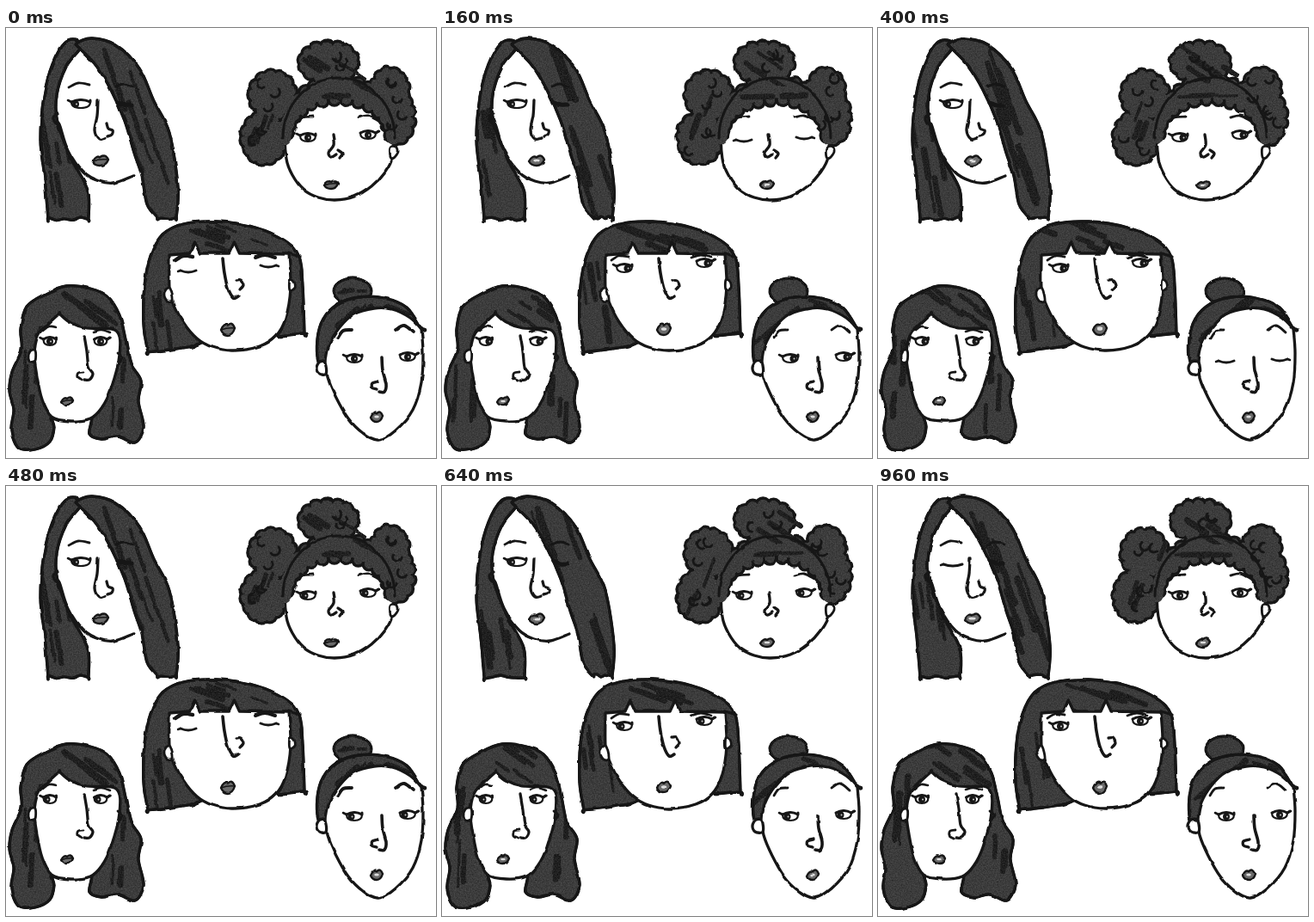
Recreate the animation shown at these times as an HTML page. Size 500x500 px, loop 1.04 s.

```html
<!DOCTYPE html>
<html lang="en">
<head>
<meta charset="utf-8">
<title>Five faces</title>
<style>
html, body { margin: 0; width: 100%; height: 100%; overflow: hidden; background: #fff; }
svg { display: block; width: 100vw; height: 100vh; }
</style>
</head>
<body>
<svg id="stage" viewBox="0 0 500 500"></svg>
<script>
const INK = '#171717', TONE = '#3c3c3c', DARK = '#202020', STEP = 80;
const ORDER = 'AEBDECABDACBE', SHEETS = 'ABCDE';
let clips = 0;

function random(seed) {
  let s = seed * 7919 + 17;
  return () => (s = (s * 16807) % 2147483647) / 2147483647;
}

// Smooth curve through points; a repeated point makes a corner.
function curve(s, closed) {
  const n = s.trim().split(/\s+/).map(Number), p = [];
  for (let i = 0; i < n.length; i += 2) p.push([n[i], n[i + 1]]);
  const L = p.length, at = i => closed ? p[(i + L) % L] : p[Math.max(0, Math.min(L - 1, i))];
  let d = 'M' + p[0];
  for (let i = 0; i < (closed ? L : L - 1); i++) {
    const [a, b, c, e] = [at(i - 1), at(i), at(i + 1), at(i + 2)];
    d += `C${b[0] + (c[0] - a[0]) / 6} ${b[1] + (c[1] - a[1]) / 6} ${c[0] - (e[0] - b[0]) / 6} ${c[1] - (e[1] - b[1]) / 6} ${c}`;
  }
  return d + (closed ? 'Z' : '');
}

const shape = (d, fill = 'none', w = 3.3, stroke = INK) =>
  `<path d="${d}" fill="${fill}" stroke="${stroke}" stroke-width="${w}"/>`;
const line = (s, w) => shape(curve(s), 'none', w);
const skin = (s, w) => shape(curve(s, true), '#fff', w);
const oval = (x, y, rx, ry, fill, extra = '') =>
  `<ellipse cx="${x}" cy="${y}" rx="${rx}" ry="${ry}" fill="${fill}" ${extra}/>`;
const grain = (body, k) => `<g filter="url(#grain${k})">${body}</g>`;

// Loose marker strokes running from a towards b.
function marks(rnd, n, a, b, spread) {
  let out = '';
  for (let i = 0; i < n; i++) {
    const t = rnd() * .7, u = t + .15 + rnd() * .25, off = (rnd() - .5) * spread;
    const at = q => `${a[0] + (b[0] - a[0]) * q + off} ${a[1] + (b[1] - a[1]) * q - off * .3}`;
    out += shape(`M${at(t)}L${at(u)}`, 'none', 3 + rnd() * 5, DARK);
  }
  return out;
}

function hair(s, strokes, k) {
  const d = curve(s, true), id = 'clip' + clips++;
  return `<clipPath id="${id}"><path d="${d}"/></clipPath>` +
    grain(shape(d, TONE) + `<g clip-path="url(#${id})">${strokes}</g>`, k) + shape(d);
}

// Uneven cut ends between two points.
function ends(x0, x1, y, rnd) {
  let s = `${x0} ${y} `;
  for (let i = 0; i <= 5; i++) s += `${x0 + (x1 - x0) * i / 5} ${y + rnd() * 4 - 2} `;
  return s + `${x1} ${y} `;
}

function lips(x, y, w, h, open) {
  const d = `M${x - w} ${y + 1}Q${x - w * .5} ${y - h * 1.1} ${x} ${y - h * .6}Q${x + w * .6} ${y - h * 1.4} ${x + w} ${y - 1}Q${x + w * .7} ${y + h} ${x} ${y + h}Q${x - w * .7} ${y + h} ${x - w} ${y + 1}Z`;
  return shape(d, '#6a6a6a', 2.4) + (open
    ? oval(x, y, w * .4, h * .25, '#ddd')
    : shape(`M${x - w} ${y + 1}Q${x} ${y - 2} ${x + w} ${y - 1}`, 'none', 1.5));
}

function openEye(x, y, side, r, g) {
  return shape(`M${x - r} ${y - 2}Q${x} ${y - 7} ${x + r} ${y - 2}Q${x + r} ${y + 5} ${x} ${y + 5}Q${x - r} ${y + 5} ${x - r} ${y - 2}Z`, '#fff', 2.2) +
    shape(`M${x - r} ${y - 2}Q${x} ${y - 7} ${x + r} ${y - 2}l${side > 0 ? 3 : 0} -2`, 'none', 3) +
    oval(x + g, y + .5, 4, 4, INK) + oval(x + g + 1, y + .5, 1, 1, '#ccc') +
    shape(`M${x + side * r} ${y - 2}l${side * 4} -2`, 'none', 2.6);
}

const shutEye = (x, y, side, r) =>
  shape(`M${x - r} ${y + 3}Q${x} ${y + 7} ${x + r} ${y + 3}`, 'none', 3) +
  shape(`M${x + side * r} ${y + 3}l${side * 3} 1`, 'none', 2.4);

// Eyes are [x, y, outer side]; blink lists the steps with closed lids.
const LOOKS = [
  { eyes: [[87, 88, -1]], r: 11, gaze: -6, blink: [12] },
  { eyes: [[351, 127, -1], [421, 124, 1]], r: 9, blink: [2, 10] },
  { eyes: [[212, 279, -1], [305, 273, 1]], r: 9, blink: [0, 6] },
  { eyes: [[51, 364, -1], [110, 364, 1]], r: 7.5, blink: [] },
  { eyes: [[405, 384, -1], [467, 382, 1]], r: 9, blink: [5] }
];
// The first loop half glances right, the second left.
const glance = i => i % 3 === 0 && i < 6 || i > 10 ? 0 : i < 6 ? 3.5 : -3.5;
const eyes = i => LOOKS.map(f => f.eyes.map(e => f.blink.includes(i)
  ? shutEye(...e, f.r) : openEye(...e, f.r, f.gaze || glance(i))).join('')).join('');

function longHair(k, rnd) {
  return hair('84 15 69 17 54 42 44 80 40 130 45 175 ' + ends(49, 96, 222, rnd) +
      '95 188 76 152 60 110 59 78 70 45 86 24', marks(rnd, 6, [50, 90], [72, 225], 34), k) +
    hair('82 18 100 12 128 20 155 47 172 85 190 122 200 185 ' + ends(198, 176, 221, rnd) +
      '164 205 158 172 149 145 138 108 122 72 105 44 86 24', marks(rnd, 11, [115, 25], [185, 225], 46), k) +
    line('60 100 55 104 58 111 62 112 72 142 90 168 108 178 126 180 148 172') +
    line('128 68 137 65 147 68', 2.8) + line('130 87 138 90 146 90', 5) +
    line('107 84 106 102 103 119 108 129 115 128') + line('117 111 119 117 124 119 123 124 118 126') +
    line('73 69 84 64 97 66', 2.8) + lips(110, 154, 9, 6, k);
}

// Puffs with round bumps along their rims.
function curlyHair(k, rnd) {
  const puffs = [[300, 128, 28, 32], [310, 78, 29, 30], [375, 40, 36, 26], [446, 72, 24, 27], [453, 104, 24, 33], [388, 110, 66, 56]];
  const rims = [], curls = [];
  for (const [x, y, rx, ry] of puffs) {
    const n = Math.round((rx + ry) / 4.4), a0 = rnd() * 6.28;
    for (let i = 0; i < n; i++) {
      const a = a0 + i * 6.283 / n;
      rims.push([x + (rx - 8) * Math.cos(a), y + (ry - 8) * Math.sin(a), 8]);
    }
    if (rx < 40) for (let i = 0; i < 3; i++)
      curls.push([x + (rnd() - .5) * rx, y + (rnd() - .5) * ry, rnd() * 150 - 75]);
  }
  const fringe = [];
  for (let i = 0; i <= 13; i++) {
    const a = Math.PI * (1.02 + .98 * i / 13);
    fringe.push([387 + 60 * Math.cos(a), 125 + 42 * Math.sin(a), 7]);
  }
  const dots = (list, grow, fill) => list.map(([x, y, r]) => oval(x, y, r + grow, r + grow, fill)).join('');
  const mass = puffs.map(([x, y, rx, ry]) => oval(x, y, rx - 6, ry - 6, TONE)).join('');
  const arc = (rx, ry) => `M${387 - rx} 128A${rx} ${ry} 0 0 1 ${387 + rx} 128`;
  return dots(rims, 1.8, INK) +
    grain(dots(rims, -1.4, TONE) + mass + marks(rnd, 4, [350, 20], [440, 80], 40) + marks(rnd, 3, [320, 70], [290, 150], 30), k) +
    skin('326 122 326 152 333 171 346 188 363 197 382 200 405 196 425 184 440 168 449 150 448 122 430 98 386 82 345 94') +
    dots(fringe, 1.6, INK) + grain(dots(fringe, -1.5, TONE) + shape(arc(63, 54), 'none', 15, TONE) + marks(rnd, 3, [345, 80], [435, 78], 8), k) +
    shape(arc(65, 70), 'none', 3) +
    curls.map(([x, y, a]) => `<path d="M-5 -3A5.5 5 0 1 0 5 1" transform="translate(${x} ${y}) rotate(${a})" fill="none" stroke="${INK}" stroke-width="2.8"/>`).join('') +
    skin('447 139 454 138 456 144 451 151 447 150', 2.8) +
    line('337 109 345 104 357 103', 2.8) + line('410 104 421 102 433 108', 2.8) +
    line('380 124 381 136 375 145 378 150 384 147') + line('386 142 391 146 388 151') + lips(378, 182, 8, 5, k);
}

function bobHair(k, rnd) {
  let top = 'M190 264';
  for (const x of [222, 268]) {
    const c = x + rnd() * 8 - 4;
    top += `L${c - 6} 262L${c} 249L${c + 6} 262`;
  }
  const chin = curve('329 263 331 302 325 338 314 358 295 370 265 375 240 371 222 361 206 342 194 318 190 302 190 264');
  return hair('165 377 160 345 161 300 168 265 182 240 206 228 245 225 290 232 324 247 341 266 345 300 347 355 347 355 318 358 318 358 270 350 218 370 218 370 190 374 165 377',
      marks(rnd, 7, [200, 225], [300, 262], 40) + marks(rnd, 5, [176, 270], [190, 376], 34), k) +
    shape(top + chin.replace('M', 'L') + 'Z', '#fff') + line('329 262 342 266') +
    skin('191 303 186 304 184 311 188 318 194 317', 2.8) + skin('330 293 335 295 336 302 330 305', 2.8) +
    line('252 268 254 285 258 303 264 314 270 312', 3.6) + line('268 293 273 293 276 299 272 304') +
    line('197 270 206 265 217 266', k ? 2.8 : 4.5) + line('290 267 301 264 313 267', k ? 2.8 : 4) + lips(258, 350, 8, 7, k);
}

function wavyHair(k, rnd) {
  return hair('70 300 46 309 24 324 17 350 18 374 7 400 4 422 9 444 6 468 15 489 34 490 51 481 56 464 54 448 78 440 99 450 97 472 111 478 130 475 150 482 160 464 154 434 157 410 145 390 139 362 132 334 118 312 98 303',
      marks(rnd, 7, [60, 300], [130, 350], 40) + marks(rnd, 5, [30, 330], [24, 485], 26) + marks(rnd, 3, [136, 370], [132, 475], 30), k) +
    skin('62 332 62 332 74 342 94 349 128 352 132 380 122 420 111 442 98 454 75 457 53 452 42 432 36 405 33 380 37 358 48 345') +
    skin('34 375 28 376 26 384 29 389 34 387', 2.8) + line('130 378 135 383 131 389', 2.8) +
    line('91 358 94 376 96 394 101 402 97 409 91 409') + line('90 400 84 401 83 406 88 409', 2.8) +
    line('43 352 50 347 58 348', 2.6) + line('102 353 111 351 121 354', 2.6) + lips(71, 434, 7, 5, k);
}

function bunHair(k, rnd) {
  return grain(oval(403, 306, 22, 15, TONE, `stroke="${INK}" stroke-width="3.3"`) + (k ? '' : marks(rnd, 4, [386, 306], [420, 306], 14)), k) +
    hair('364 390 362 362 369 338 386 321 410 313 440 314 466 325 483 350 483 350 430 350 380 390',
      marks(rnd, 8, [366, 370], [430, 315], 24) + marks(rnd, 3, [420, 316], [480, 336], 10), k) +
    skin('483 350 483 350 470 337 449 327 428 326 404 333 388 348 376 368 372 388 374 406 384 430 398 454 415 471 433 479 453 468 473 444 483 412 485 378') +
    skin('372 389 365 388 361 395 364 402 373 402') +
    line('437 383 438 398 442 414 440 423 434 423', 3.6) + line('432 411 425 413 425 418 431 420') +
    line('386 360 392 352 402 351', k ? 2.8 : 3.8) + line('453 351 463 346 474 354', k ? 2.8 : 3.8) + lips(431, 452, 7, 6, 1);
}

const HEADS = [longHair, curlyHair, bobHair, wavyHair, bunHair];
let filters = '', drawn = '';
[...SHEETS].forEach((_, k) => {
  filters += `<filter id="grain${k}" color-interpolation-filters="sRGB">
    <feTurbulence type="fractalNoise" baseFrequency=".7" numOctaves="2" seed="${k + 3}"/>
    <feColorMatrix values="1 0 0 0 0 1 0 0 0 0 1 0 0 0 0 0 0 0 0 1" result="n"/>
    <feComposite in="SourceGraphic" in2="n" operator="arithmetic" k2="1" k3=".2" k4="-.1"/>
    <feComposite in2="SourceAlpha" operator="in"/></filter>
    <filter id="wobble${k}" filterUnits="userSpaceOnUse" x="0" y="0" width="500" height="500">
    <feTurbulence type="fractalNoise" baseFrequency=".06" numOctaves="2" seed="${k + 11}"/>
    <feDisplacementMap in="SourceGraphic" scale="3" xChannelSelector="R" yChannelSelector="G"/></filter>`;
  drawn += `<g class="sheet" filter="url(#wobble${k})" visibility="hidden">${HEADS.map((head, i) => head(k, random(k * 5 + i + 1))).join('')}</g>`;
});
const stage = document.getElementById('stage');
stage.innerHTML = `<defs>${filters}</defs><rect width="500" height="500" fill="#fff"/>
  <g stroke-linecap="round" stroke-linejoin="round">${drawn}<g id="eyes"></g></g>`;

const pages = stage.querySelectorAll('.sheet'), eyeLayer = document.getElementById('eyes');
let shown = -1;
function show(i) {
  if (i === shown) return;
  shown = i;
  pages.forEach((g, k) => g.setAttribute('visibility', SHEETS[k] === ORDER[i] ? 'visible' : 'hidden'));
  eyeLayer.innerHTML = eyes(i);
}
const start = performance.now();
function tick() {
  show(Math.floor((performance.now() - start) / STEP) % ORDER.length);
  requestAnimationFrame(tick);
}
tick();
</script>
</body>
</html>
```
